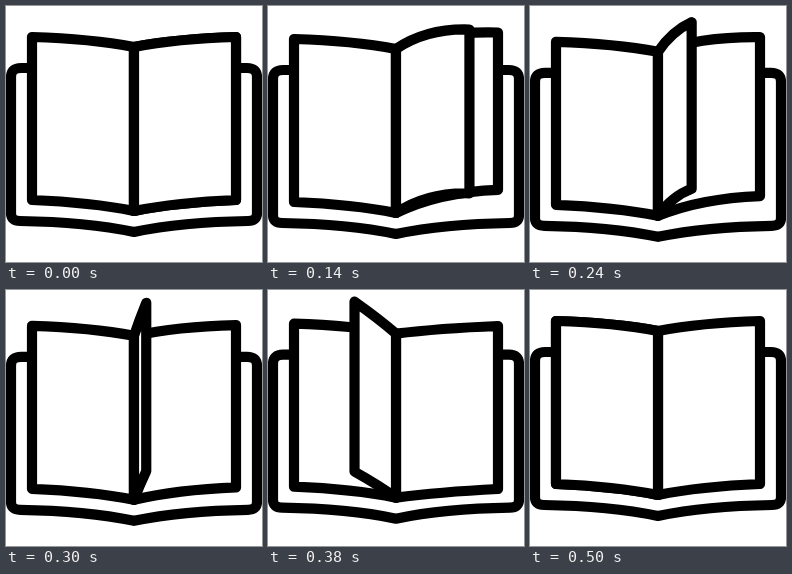
An HTML page for the animation above (0.56 s loop, 256x256 px).

```html
<!DOCTYPE html>
<html lang="en">
<head>
<meta charset="utf-8">
<title>Book</title>
<style>
html, body { margin: 0; width: 100%; height: 100%; overflow: hidden; background: #fff; }
svg { display: block; width: 100vw; height: 100vh; }
path { fill: #fff; stroke: #000; stroke-width: 10.2; stroke-linejoin: round; }
.cover { fill: none; }
</style>
</head>
<body>
<svg viewBox="0 0 256 256">
  <g id="book">
    <path class="cover" d="M23 62H15Q5 62 5 71V207Q5 215 14 215Q80 216 128 226
      Q176 216 242 215Q251 215 251 207V71Q251 62 241 62H233"/>
    <path id="left"/>
    <path id="right"/>
    <path id="sheet"/>
  </g>
</svg>
<script>
const LOOP = 560, STEP = 20, START = 40, END = 500;
const SPINE = 128, WIDTH = 102, BOB = 5;
const SPINE_TOP = 41, SPINE_BOTTOM = 205, TOP = 31, BOTTOM = 194, BOW = 4;

// Time and reach of the turning sheet: 1 lies right, -1 lies left
const TURN = [[START, 1], [100, 0.9], [180, 0.54], [300, 0.12], [420, -0.67], [END, -1]];

const $ = id => document.getElementById(id);
const book = $('book'), left = $('left'), right = $('right'), sheet = $('sheet');

function reach(t) {
  const i = Math.max(1, TURN.findIndex(([time]) => t <= time));
  const [t0, a] = TURN[i - 1], [t1, b] = TURN[i];
  return a + (b - a) * (t - t0) / (t1 - t0);
}

// A page from the spine to its outer edge, with both long sides bowed upwards
function drawPage(el, p, top, bottom, bow) {
  const x = SPINE + WIDTH * p;
  const bend = (from, to) => `${SPINE + 0.42 * WIDTH * p} ${from + 0.42 * (to - from) - bow}`;
  el.setAttribute('d',
    `M${SPINE} ${SPINE_TOP}Q${bend(SPINE_TOP, top)} ${x} ${top}V${bottom}` +
    `Q${bend(SPINE_BOTTOM, bottom)} ${SPINE} ${SPINE_BOTTOM}Z`);
}

function draw(time) {
  const step = Math.floor((time % LOOP) / STEP) * STEP;
  const t = Math.min(END, Math.max(START, step));
  const p = reach(t);
  const lift = 1 - p * p;
  const wave = 6.75 * lift * lift * p * p;
  const crest = p > 0 ? wave : 0, sag = p < 0 ? wave : 0;
  const bob = BOB * Math.sin(Math.PI * (t - START) / (END - START)) ** 2;

  book.setAttribute('transform', `translate(0 ${bob})`);
  drawPage(right, 1, TOP - 8 * crest + 3 * sag, BOTTOM - 15 * crest + 3 * sag,
    BOW + 9 * crest - 2.5 * sag);
  drawPage(sheet, p, TOP - lift * (24 - 6 * p), BOTTOM - 18 * lift,
    BOW * Math.abs(p) + 12 * crest);
}

drawPage(left, -1, TOP, BOTTOM, BOW);

const begin = performance.now();
function tick() {
  draw(performance.now() - begin);
  requestAnimationFrame(tick);
}
tick();
</script>
</body>
</html>
```
